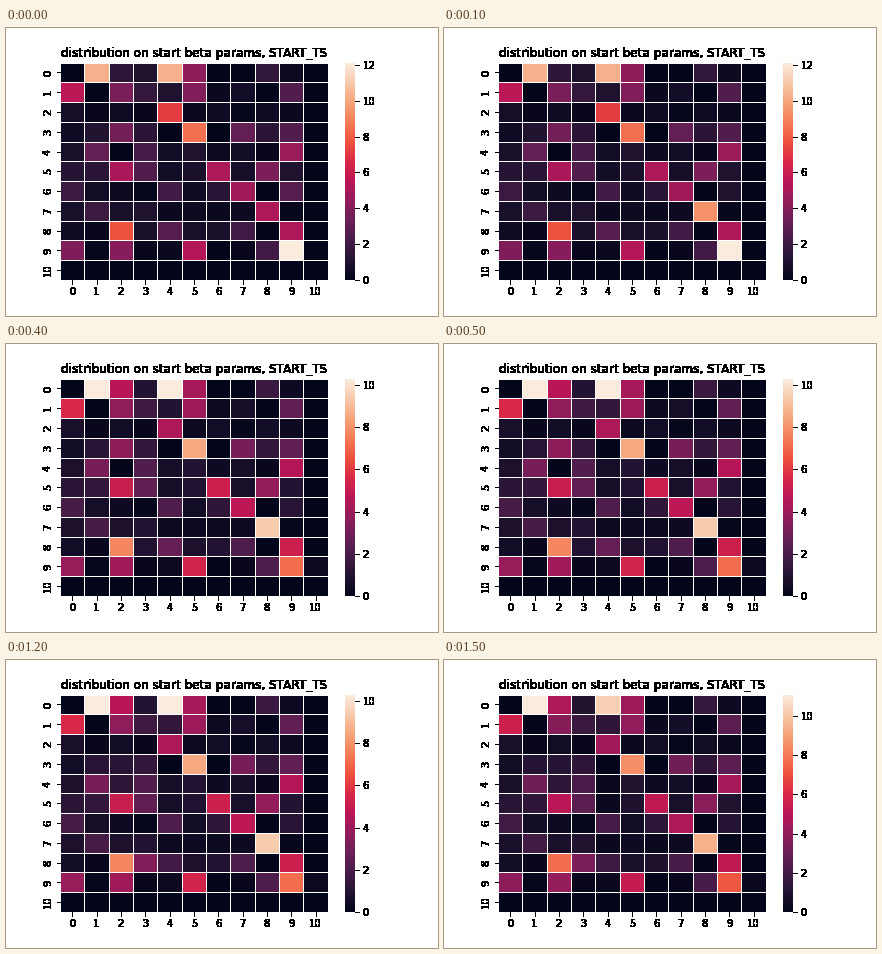
Write a matplotlib script that moves like this. It is 432 by 288 pixels and loops after 6200 ms.

```python
import numpy as np
import matplotlib.pyplot as plt
from matplotlib.animation import FuncAnimation
from matplotlib.colors import LinearSegmentedColormap

STEP = 100      # ms per frame
LOOP = 6200     # ms per loop
N = 11

ROCKET = LinearSegmentedColormap.from_list("rocket_like", [
    "#03051A", "#221331", "#451C47", "#6A1F56", "#921C5B", "#B91657",
    "#D92847", "#ED513E", "#F47C56", "#F6A47B", "#F7C9AA", "#FAEBDD"])

# Starting weights; the last row and column stay empty.
START = np.zeros((N, N))
START[:10, :10] = [
    [0, 10.3, 1.5, 1, 10.3, 4.3, 0, 0, 1.6, .4],
    [5.6, 0, 3.7, 1.7, 1, 4, .3, .6, 0, 2.6],
    [.7, .2, .5, .2, 7.2, .3, .5, .1, .5, .3],
    [.5, 1.1, 3.6, 1.4, 0, 8.5, 0, 3.1, 1.4, 2.6],
    [.8, 3.1, 0, 2.2, .6, 1, .4, .6, .2, 4.6],
    [1.2, 1.4, 5.1, 2.6, .6, .9, 5.2, .7, 3.8, 1],
    [1.9, .6, .4, .1, 2.1, .5, 1.3, 4.8, 0, 2.7],
    [.8, 1.9, .8, 1, .3, .4, .3, .4, 5.2, .1],
    [.5, .2, 7.75, .9, 2.7, .8, .9, 2.1, 0, 5.2],
    [3.9, .1, 4.1, .2, .3, 5.4, 0, .2, 2.1, 12.13]]

# Time in ms -> {(row, column): new weight}
EVENTS = {
    100: {(6, 9): 1.1, (7, 8): 9.4},
    300: {(9, 9): 7.2, (9, 10): .3},
    400: {(0, 2): 4.7, (2, 4): 4.4},
    500: {(1, 4): 1.4},
    1100: {(3, 2): 1.1, (4, 2): 1.3},
    1200: {(8, 3): 3.4, (8, 4): 1.8},
    1400: {(0, 1): 11.09},
    1500: {(4, 4): .3, (5, 4): .3},
}


def weights(ms):
    grid = START.copy()
    for start, cells in EVENTS.items():
        if ms >= start:
            for cell, value in cells.items():
                grid[cell] = value
    return grid


def harden(img, dpi):
    """Turn every touched pixel solid, for jagged black lettering."""
    solid = np.zeros_like(img)
    solid[..., 3] = img[..., 3] > 0
    return solid, 0, 0


plt.rcParams.update({"font.family": "DejaVu Sans", "font.size": 10})
fig, ax = plt.subplots(figsize=(6, 4), dpi=72, facecolor="white")
fig.subplots_adjust(left=.125, right=.9, bottom=.125, top=.88)

mesh = ax.pcolormesh(START, cmap=ROCKET, edgecolors="white", linewidth=.5)
ax.set(xlim=(0, N), ylim=(N, 0))
ax.spines[:].set_visible(False)
ax.set_xticks(np.arange(N) + .5, range(N))
ax.set_yticks(np.arange(N) + .5, range(N), rotation=90, va="center")
title = ax.set_title("distribution on start beta params, START_TS", fontsize=12)

bar = fig.colorbar(mesh, ax=ax, ticks=range(0, 13, 2))
bar.outline.set_linewidth(0)

for artist in (title, ax.xaxis, ax.yaxis, bar.ax.yaxis):
    artist.set_agg_filter(harden)


def draw(i):
    grid = weights(i * STEP)
    mesh.set_array(grid)
    mesh.set_clim(0, grid.max())
    return [mesh]


anim = FuncAnimation(fig, draw, frames=LOOP // STEP, interval=STEP,
                     init_func=lambda: draw(0), repeat=True, repeat_delay=0)
plt.show()
```
